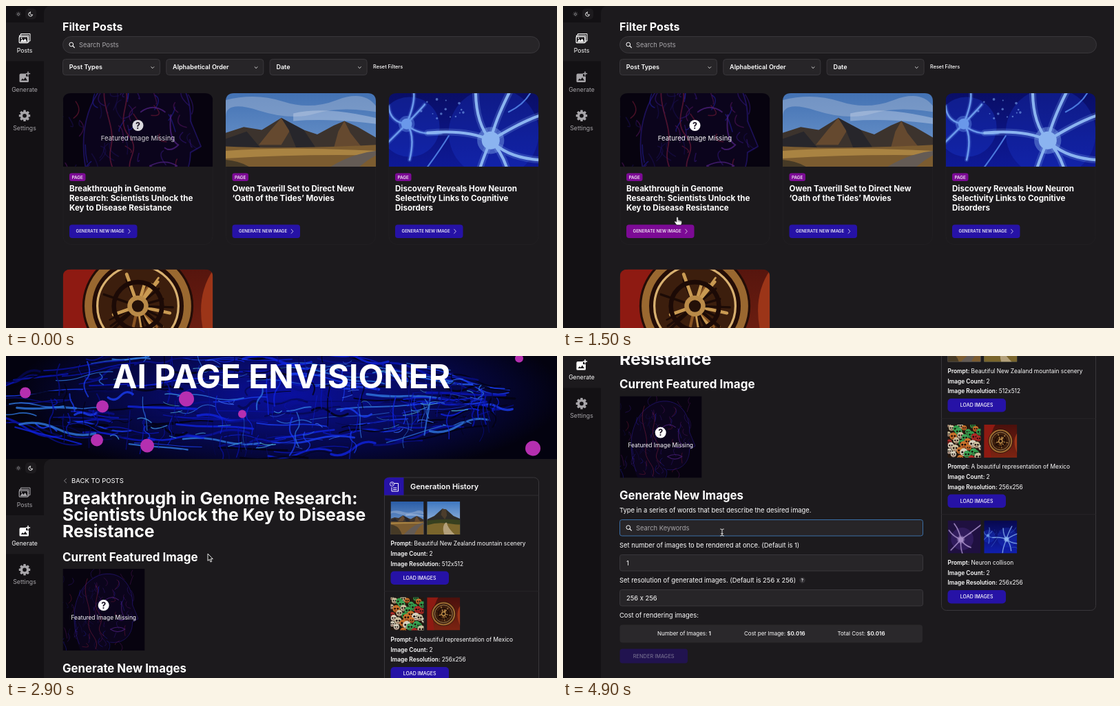
These frames come from a looping animation (800 px wide and 469 px high, 5000 ms). An HTML page:

```html
<!DOCTYPE html>
<html lang="en">
<head>
<meta charset="utf-8">
<title>Post images</title>
<style>
html, body { margin: 0; width: 100%; height: 100%; overflow: hidden; background: #1c1a1d; }
svg { display: block; }
#stage { width: 800px; height: 469px; }
text { font-family: Inter, "Open Sans", sans-serif; white-space: pre; }
</style>
</head>
<body>
<svg id="stage" viewBox="0 0 800 469"></svg>
<script>
const LOOP = 5000, STEP = 100;
const INK = '#1c1a1d', SIDE = '#131114', BLUE = '#2612a6', PURPLE = '#7c0a95';
const FIELD = '#272528', EDGE = '#39373b', GREY = '#a8a6aa', WHITE = '#fff';

let seed = 11;
const rnd = (a = 0, b = 1) => {
  seed = (seed * 16807) % 2147483647;
  return a + (b - a) * seed / 2147483647;
};
const pick = list => list[Math.floor(rnd(0, list.length))];
const many = (n, fn) => Array.from({ length: n }, (_, i) => fn(i)).join('');

// Basic shapes
const rect = (x, y, w, h, fill, r = 0, more = '') =>
  `<rect x="${x}" y="${y}" width="${w}" height="${h}" rx="${r}" fill="${fill}" ${more}/>`;
const dot = (x, y, r, fill, more = '') => `<circle cx="${x}" cy="${y}" r="${r}" fill="${fill}" ${more}/>`;
const shape = (d, fill, more = '') => `<path d="${d}" fill="${fill}" ${more}/>`;
const line = (d, color, w = 1, more = '') =>
  `<path d="${d}" fill="none" stroke="${color}" stroke-width="${w}" stroke-linecap="round" stroke-linejoin="round" ${more}/>`;
const group = (x, y, body, more = '') => `<g transform="translate(${x} ${y})" ${more}>${body}</g>`;
const text = (x, mid, size, weight, str, fill = WHITE, anchor = 'start') =>
  `<text x="${x}" y="${mid + size * .36}" font-size="${size}" font-weight="${weight}" fill="${fill}" text-anchor="${anchor}">${str}</text>`;
const art = (id, x, y, w, h) => `<use href="#${id}" x="${x}" y="${y}" width="${w}" height="${h}"/>`;
const stops = (a, b) => `<stop stop-color="${a}"/><stop offset="1" stop-color="${b}"/>`;
const grad = (id, a, b) => `<linearGradient id="${id}" x2="0" y2="1">${stops(a, b)}</linearGradient>`;
const chevron = (x, y, dx, dy, color = WHITE, w = .8) =>
  line(dx ? `M${x - dx} ${y - 3}L${x + dx} ${y}L${x - dx} ${y + 3}` : `M${x - 2} ${y - dy}L${x} ${y + dy}L${x + 2} ${y - dy}`, color, w);

// Pictures, each in a 100 x 100 box
function neuron(x, y, r, ends, color, w) {
  const arms = ends.map(([ex, ey], i) => {
    const bend = i % 2 ? 5 : -5;
    return `M${x} ${y}Q${(x + ex) / 2 + bend} ${(y + ey) / 2 - bend} ${ex} ${ey}`;
  }).join('');
  return line(arms, color, w * 2.4, 'opacity=".22"') + line(arms, color, w) +
    dot(x, y, r * 1.5, color, 'opacity=".4"') + dot(x, y, r, color);
}

const pictures = {
  face: () => rect(0, 0, 100, 100, '#07030f') +
    shape('M22 100C8 70 10 20 45 6C72 0 88 22 86 48L92 62L85 66C84 82 74 92 58 90L54 100Z', '#0b041c') +
    many(80, () => {
      const x = rnd(0, 88), y = rnd(0, 92), c = pick(['#34167a', '#2220a0', '#561560', '#7c1a38', '#1a1050']);
      return line(`M${x} ${y}q${rnd(-8, 8)} ${rnd(2, 8)} ${rnd(-5, 5)} ${rnd(4, 13)}`, c, .7, 'opacity=".55"');
    }) +
    line('M20 92C8 62 12 22 44 8C70 0 86 20 85 44L92 61L85 65C85 80 76 92 58 90', '#2a1a86', .8, 'opacity=".6"') +
    line('M30 12C22 34 36 44 32 62S46 84 40 98M40 20C48 30 34 42 44 54S36 72 50 82', '#7c1d3c', .8, 'opacity=".6"') +
    line('M52 38Q60 32 68 38M72 40Q70 56 77 60Q72 65 68 62M58 74Q68 69 76 74Q67 80 58 74', '#4a1f78', .9, 'opacity=".8"'),
  valley: () => rect(0, 0, 100, 100, 'url(#sky)') +
    shape('M0 30Q20 25 38 31T74 30T100 34V38Q76 34 60 39T22 37T0 41Z', '#9fb4d4', 'opacity=".5"') +
    shape('M45 39Q66 34 100 42V46Q70 42 45 44Z', '#c3d0e6', 'opacity=".45"') +
    shape('M0 52L12 48L24 50L37 42L52 50L61 53L72 47L79 44L88 48L100 55V64H0Z', '#3c332d') +
    shape('M37 42L43 50L37 60H22L30 50ZM79 44L83 52L91 62H72L75 51Z', '#65492f') +
    shape('M37 42L52 50L60 62H47L42 50ZM0 56L14 51L24 63H0Z', '#27262b') +
    shape('M0 61Q40 63 100 60V100H0Z', '#7c5c30') +
    shape('M0 64Q40 61 100 64V67Q50 66 0 69Z', '#a98342') +
    shape('M100 64Q70 67 40 100H72Q80 78 100 67Z', '#645b55') +
    shape('M0 70Q25 72 34 100H0Z', '#463a26'),
  peak: () => rect(0, 0, 100, 100, 'url(#haze)') +
    shape('M0 54L22 44L46 22L58 24L80 44L100 52V70H0Z', '#2e2c28') +
    shape('M46 22L42 40L54 54L60 42L58 24Z', '#4c3d2c') +
    shape('M0 58Q50 50 100 56V100H0Z', '#37401f') +
    shape('M0 72Q30 62 60 66T100 70V100H0Z', '#7a652c') +
    shape('M56 64Q44 76 52 100H84Q62 80 60 64Z', '#b3a07a'),
  nerve: () => rect(0, 0, 100, 100, 'url(#deep)') +
    dot(70, 52, 30, '#1c39d0', 'opacity=".3"') + dot(14, 48, 20, '#1c39d0', 'opacity=".35"') +
    many(14, () => dot(rnd(20, 50), rnd(29, 44), rnd(.4, .9), '#7aa6ef', 'opacity=".6"')) +
    neuron(12, 46, 3.6, [[0, 34], [16, 22], [-2, 60], [24, 33], [35, 52], [14, 70]], '#6a98ea', 1.2) +
    neuron(68, 57, 6, [[84, 18], [102, 40], [100, 70], [82, 92], [56, 98], [26, 52], [58, 24]], '#8bb4f0', 1.9) +
    line('M80 38Q92 32 96 22M40 54Q34 64 22 80M84 82Q96 78 102 86', '#4a78dc', 1),
  violet: () => rect(0, 0, 100, 100, '#1f1040') + dot(44, 56, 34, '#432678', 'opacity=".5"') +
    neuron(40, 58, 8, [[4, 30], [10, 90], [46, 104], [70, 38], [100, 14], [20, 10], [70, 82]], '#a58cc6', 2.4),
  dial: () => rect(0, 0, 100, 100, 'url(#ember)') +
    shape('M0 0H34Q10 40 22 100H0Z', '#8e1a12') + shape('M100 26Q84 50 100 86Z', '#9c3518') +
    dot(50, 50, 37, '#240d07') + dot(50, 50, 33, 'none', 'stroke="#9a6830" stroke-width="5"') +
    dot(50, 50, 27, '#3c1e0d', 'stroke="#d8b070" stroke-width="1.5"') +
    many(26, () => {
      const a = rnd(0, 6.28), r = rnd(14, 25);
      return line(`M50 50l${r * Math.cos(a)} ${r * Math.sin(a)}`, pick(['#8a5422', '#c99a52', '#1c0b06']), rnd(1, 2.4));
    }) +
    dot(50, 50, 16, 'none', 'stroke="#1c0a06" stroke-width="3"') + dot(50, 50, 7, '#b98a48') + dot(50, 50, 4, '#241008'),
  skulls: () => rect(0, 0, 100, 100, '#24170f') + many(38, i => {
    const x = (i * 37) % 100 + rnd(-6, 6), y = i * 2.7 + rnd(-4, 4), r = rnd(7, 12);
    const c = pick(['#2f9b4a', '#b02a26', '#c9bd9c', '#3aa454', '#c8702a', '#d6d0bc']);
    return dot(x, y, r, c) + dot(x - r * .38, y, r * .27, '#1c0e0c') + dot(x + r * .38, y, r * .27, '#1c0e0c') +
      line(`M${x - r * .4} ${y + r * .6}h${r * .8}`, '#5a1414', 1.6);
  })
};

const defs = () => '<defs>' +
  grad('sky', '#2a5da6', '#8db0dc') + grad('haze', '#3f78c0', '#bfd2ea') +
  grad('deep', '#07084e', '#101fae') + grad('ember', '#4a100c', '#7c2412') +
  `<radialGradient id="glow">${stops('#0a10a0', '#03020f')}</radialGradient>` +
  '<clipPath id="top"><path d="M0 107V12Q0 0 12 0H206Q218 0 218 12V107Z"/></clipPath>' +
  '<clipPath id="strip"><path d="M0 -90H800V183.5H0Z"/></clipPath>' +
  Object.keys(pictures).map(id =>
    `<symbol id="${id}" viewBox="0 0 100 100" preserveAspectRatio="xMidYMid slice">${pictures[id]()}</symbol>`).join('') +
  '</defs>';

function banner() {
  // Half height of the fibre bundle, which narrows to both ends
  const half = x => 12 + 74 * Math.sin(Math.PI * Math.min(1, Math.max(0, (x + 90) / 850)));
  const tones = ['#03020f', '#060850', '#080e86', '#0a16b8', '#0f24e0', '#1a3cf0', '#0a12a0', '#2f78e0'];
  const strands = many(230, () => {
    const w = rnd(30, 130), x = rnd(-30, 740 - w), y = rnd(-1, 1), a = half(x) * y, b = half(x + w) * y + rnd(-8, 8);
    return line(`M${x} ${100 + a}q${w / 4} ${rnd(-9, 9)} ${w / 2} ${(b - a) / 2}t${w / 2} ${(b - a) / 2}`,
      pick(tones), rnd(.7, 3.6), 'opacity=".8"');
  });
  const threads = many(120, () => {
    const x = rnd(60, 735), h = half(x), y = rnd(-1, .6) * h, d = rnd(14, 60);
    return line(`M${x} ${100 + y}q${rnd(-8, 8)} ${d / 3} ${rnd(-4, 4)} ${d / 2}t${rnd(-5, 5)} ${d / 2}`,
      pick(tones), rnd(.6, 2.2), 'opacity=".75"');
  });
  const sparks = many(45, () => {
    const x = rnd(150, 700), y = 100 + half(x) * rnd(-.8, .8);
    return line(`M${x} ${y}q${rnd(2, 10)} ${rnd(-6, 6)} ${rnd(8, 24)} ${rnd(-6, 6)}`, pick(['#3f96d8', '#4fb0d0', '#3a6cf0']), rnd(.6, 1.5), 'opacity=".8"');
  });
  const cells = [[262, 96, 11], [343, 118, 6], [140, 107, 9], [28, 87, 8], [132, 156, 9],
    [205, 164, 10], [765, 168, 11], [745, 37, 6], [60, 4, 7]]
    .map(([x, y, r]) => dot(x, y, r, '#b52fb0')).join('');
  return '<g clip-path="url(#strip)">' + rect(0, -90, 800, 280, '#03020f') +
    '<ellipse cx="410" cy="90" rx="400" ry="125" fill="url(#glow)"/>' +
    strands + threads + sparks + cells + '</g>' +
    text(400, 63.5, 47.8, 700, 'AI PAGE ENVISIONER', WHITE, 'middle');
}

// Interface parts
const lens = (x, y) => dot(x - .7, y - .7, 2.9, 'none', `stroke="${WHITE}" stroke-width="1"`) +
  line(`M${x + 1.5} ${y + 1.5}l2.3 2.3`, WHITE, 1.2);
const missing = (x, y, size, gap, more = '') => `<g ${more}>` + dot(x, y, 8, WHITE) +
  text(x, y, 12.5, 700, '?', '#171020', 'middle') +
  text(x, y + gap, size, 400, 'Featured Image Missing', WHITE, 'middle') + '</g>';
const field = (x, y, w, h, r, more = '') => rect(x, y, w, h, FIELD, r, `stroke="${EDGE}" stroke-width="1" ${more}`);

function card(x, y, pic, lines, more = '', button = '') {
  return group(x, y,
    rect(.5, .5, 217, 220, INK, 12, 'stroke="#211f22"') +
    `<g clip-path="url(#top)">${art(pic, 0, 0, 218, 107)}</g>` + more +
    rect(9.5, 116.5, 23.5, 11.5, PURPLE, 3) + text(21.2, 122.3, 6.4, 500, 'PAGE', WHITE, 'middle') +
    lines.map((s, i) => text(9.5, 139.3 + i * 13.6, 11.6, 700, s)).join('') +
    rect(9.5, 191.5, 98.5, 19.5, BLUE, 4, button) +
    text(19, 201.2, 6.2, 500, 'GENERATE NEW IMAGE') + chevron(96.5, 201.2, 1.3, 0, WHITE, .7));
}

const posts = () => text(82, 30.3, 16, 700, 'Filter Posts') +
  field(82.5, 44.5, 692, 24, 12) + lens(95.5, 56.7) + text(106, 56.7, 9.3, 400, 'Search Posts', GREY) +
  ['Post Types', 'Alphabetical Order', 'Date'].map((s, i) => {
    const x = 82.5 + i * 150.3;
    return field(x, 77.5, 141, 23, 4) + text(x + 9.3, 88.7, 9, 600, s) + chevron(x + 130.3, 89.7, 0, 1);
  }).join('') +
  text(533, 88.8, 7.3, 500, 'Reset Filters') +
  card(82.5, 127, 'face', ['Breakthrough in Genome', 'Research: Scientists Unlock the', 'Key to Disease Resistance'],
    missing(109, 47, 9.5, 18.3, 'id="note"'), 'id="action"') +
  card(319, 127, 'valley', ['Owen Taverill Set to Direct New', '‘Oath of the Tides’ Movies']) +
  card(555.5, 127, 'nerve', ['Discovery Reveals How Neuron', 'Selectivity Links to Cognitive', 'Disorders']) +
  card(82.5, 383.5, 'dial', []);

const pair = (x, y, size, name, value) =>
  `<text x="${x}" y="${y + size * .36}" font-size="${size}" fill="#fff"><tspan font-weight="${name[1]}">${name[0]} </tspan><tspan font-weight="${value[1]}">${value[0]}</tspan></text>`;

function entry(i, [a, b, prompt, res]) {
  const fact = (y, name, value) => pair(558.5, y, 8.35, [name, 600], [value, 400]);
  return group(0, i * 139.5,
    art(a, 558.5, 60.5, 48, 48) + art(b, 611.3, 60.5, 48, 48) +
    fact(121.7, 'Prompt:', prompt) + fact(136.5, 'Image Count:', '2') + fact(151, 'Image Resolution:', res) +
    rect(558.5, 162, 84.5, 19.5, BLUE, 5) + text(600.7, 171.7, 7, 500, 'LOAD IMAGES', WHITE, 'middle') +
    (i < 2 ? line('M549.5 191.2H773.5', '#29272b', .8) : ''));
}

const history = () => rect(549.5, 25.5, 224, 445, 'none', 7, 'stroke="#39373b"') +
  shape('M549 51.5V32Q549 25.5 556 25.5H577.5V51.5Z', BLUE) + line('M549.5 51.5H773.5', '#343236', .8) +
  line('M562 34H569.5V45.5H560V40M562.5 40.5H567M562.5 43H567', WHITE, 1) +
  dot(560.5, 35, 3, BLUE, 'stroke="#fff" stroke-width=".9"') + line('M560.5 33.5V35.2H561.8', WHITE, .7) +
  text(587, 38.3, 10.9, 600, 'Generation History') +
  [['valley', 'peak', 'Beautiful New Zealand mountain scenery', '512x512'],
   ['skulls', 'dial', 'A beautiful representation of Mexico', '256x256'],
   ['violet', 'nerve', 'Neuron collison', '256x256']].map((e, i) => entry(i, e)).join('');

const generator = () => chevron(86, 30.3, -1.6, 0, GREY) + text(95, 30.4, 9.5, 400, 'BACK TO POSTS') +
  ['Breakthrough in Genome Research:', 'Scientists Unlock the Key to Disease', 'Resistance']
    .map((s, i) => text(82, 56 + i * 24, 24.8, 700, s)).join('') +
  text(82, 141.3, 17, 700, 'Current Featured Image') +
  art('face', 82.5, 158.5, 119, 119) + missing(141.7, 211.6, 8.4, 18) +
  text(82, 303, 16.8, 700, 'Generate New Images') +
  text(82, 324.5, 9.4, 400, 'Type in a series of words that best describe the desired image.') +
  field(82.5, 338.5, 440, 23.5, 3, 'id="prompt"') + lens(95.5, 350.4) + text(106, 350.4, 9.4, 400, 'Search Keywords', GREY) +
  text(82, 375.5, 9.4, 400, 'Set number of images to be rendered at once. (Default is 1)') +
  field(82.5, 389.5, 440, 23.5, 3) + text(92, 401.3, 9.4, 400, '1') +
  text(82, 426.3, 9.4, 400, 'Set resolution of generated images. (Default is 256 x 256)') +
  dot(347.5, 426.5, 4.2, '#343236') + text(347.5, 426.5, 6, 600, '?', WHITE, 'middle') +
  field(82.5, 440.5, 440, 23.5, 3) + text(92, 452.3, 9.4, 400, '256 x 256') +
  text(82, 477.5, 9.4, 400, 'Cost of rendering images:') +
  rect(82.5, 491.5, 439.5, 26, '#2a282b', 4) +
  [[137, 'Number of Images:', '1'], [263, 'Cost per Image:', '$0.016'], [398.5, 'Total Cost:', '$0.016']]
    .map(([x, a, b]) => pair(x, 504.5, 8, [a, 400], [b, 600])).join('') +
  rect(82.5, 526.5, 98.5, 21, '#21134f', 4) + text(131.7, 537, 7.4, 500, 'RENDER IMAGES', '#716a8c', 'middle') +
  history();

const icons = [
  line('M-5.5 -4V-6.5H8V4H6', 'currentColor', 1) + line('M-7.5 -1.5V-4.2H5.8V6', 'currentColor', 1) +
    rect(-7.8, -2.3, 12.6, 9, 'none', 1, 'stroke="currentColor" stroke-width="1.2"') +
    shape('M-6.5 5.5L-3.5 1.2L-1.5 3.5L.8 .5L3.8 5.5Z', 'currentColor') + dot(-4.5, 0, .9, 'currentColor'),
  shape('M-5.5 -5H2V-1H6V6Q6 7.5 4.5 7.5H-6Q-7.5 7.5 -7.5 6V-3Q-7.5 -5 -5.5 -5ZM-5.3 5H4L1 .7L-1.4 3.8L-3 2Z', 'currentColor', 'fill-rule="evenodd"') +
    line('M5 -7.5V-2.5M2.5 -5H7.5', 'currentColor', 1.5),
  dot(0, 0, 4.6, 'none', 'stroke="currentColor" stroke-width="3.4"') +
    many(8, i => `<rect x="-1.7" y="-8.2" width="3.4" height="4" rx=".6" fill="currentColor" transform="rotate(${i * 45})"/>`)
];
const sidebar = () => rect(28, 3.5, 16, 16, '#1d1b1e', 5) +
  dot(18, 11.8, 1.5, 'none', `stroke="${GREY}" stroke-width=".8"`) +
  many(8, i => `<path d="M0 -2.6V-3.4" stroke="${GREY}" stroke-width=".7" transform="translate(18 11.8) rotate(${i * 45})"/>`) +
  line('M35.3 9A3 3 0 1 0 38.6 12.7A2.6 2.6 0 0 1 35.3 9Z', WHITE, .9) +
  rect(0, 24, 55, 56.5, INK, 0, 'id="mark"') +
  ['Posts', 'Generate', 'Settings'].map((s, i) => {
    const y = 47 + i * 56.4;
    return `<g class="tab">${group(27, y, icons[i])}${text(27, y + 18, 8.7, 400, s, 'currentColor', 'middle')}</g>`;
  }).join('');

const pointers = {
  hand: shape('M-1.2 1Q0 -1 1.2 1V4.6L5 5.6Q7 6.2 6.6 8.6L5.6 12H-1L-4.4 7.4Q-3.2 5.6 -1.2 7.4Z', WHITE, 'stroke="#111" stroke-width=".7"') +
    line('M1.2 5V7.5M3.4 5.6V7.6M5 6V8', '#333', .5),
  arrow: shape('M0 0V10.3L2.4 8.2L4 12L5.7 11.2L4.1 7.6H7.3Z', '#111', 'stroke="#fff" stroke-width=".9"'),
  beam: line('M-2.4 -5Q0 -5 0 -3.6Q0 -5 2.4 -5M0 -3.6V3.6M-2.4 5Q0 5 0 3.6Q0 5 2.4 5M-1.3 1.6H1.3', '#ddd', 1)
};

const $ = id => document.getElementById(id);
$('stage').innerHTML = defs() + rect(0, 0, 800, 469, INK) +
  `<g id="page">${rect(0, -1.5, 800, 900, SIDE)}${rect(55, -1.5, 800, 900, INK, 12)}</g>` +
  `<g id="side">${sidebar()}</g><g id="posts">${posts()}</g><g id="maker">${generator()}</g>` +
  `<g id="banner">${banner()}</g><g id="cursor">` +
  Object.keys(pointers).map(k => `<g id="${k}">${pointers[k]}</g>`).join('') + '</g>';
const tabs = [...document.querySelectorAll('.tab')];

// Motion: [time, values...]
const scroll = [[1900, 0], [2000, 30], [2200, 160], [2300, 185], [2700, 185], [2900, 151.5], [3300, -78], [3500, -92], [3800, -100]];
const path = [[500, 246, 470], [1000, 166, 307], [1500, 166, 307], [1900, 192, 276], [2400, 192, 276],
  [2900, 293, 288], [3700, 293, 288], [4300, 231, 257]];

function at(track, t, ease = k => k) {
  if (t <= track[0][0]) return track[0].slice(1);
  const i = track.findIndex(p => p[0] > t);
  if (i < 0) return track[track.length - 1].slice(1);
  const a = track[i - 1], b = track[i], k = ease((t - a[0]) / (b[0] - a[0]));
  return a.slice(1).map((v, n) => v + (b[n + 1] - v) * k);
}
const smooth = k => k * k * (3 - 2 * k);
const move = (id, x, y) => $(id).setAttribute('transform', `translate(${x} ${y})`);
const show = (id, on) => $(id).setAttribute('display', on ? 'inline' : 'none');

function draw(t) {
  const making = t >= 1900, [y] = at(scroll, t), [cx, cy] = at(path, t, smooth);
  const kind = t >= 4100 ? 'beam' : t >= 1000 && !making ? 'hand' : 'arrow';
  move('page', 0, y);
  move('side', 0, Math.max(y, -90.5));
  move('maker', 0, y);
  move('banner', 0, y - 185);
  move('cursor', cx, cy);
  show('posts', !making);
  show('maker', making);
  show('banner', making);
  show('cursor', t >= 500);
  for (const k in pointers) show(k, k === kind);
  $('mark').setAttribute('y', making ? 80.5 : 24);
  tabs.forEach((tab, i) => tab.setAttribute('color', i === +making ? WHITE : GREY));
  $('note').setAttribute('opacity', t >= 800 ? 1 : .85);
  $('action').setAttribute('fill', t >= 1000 ? PURPLE : BLUE);
  $('prompt').setAttribute('stroke', t >= 4400 ? '#3a6ea6' : EDGE);
}

function tick() {
  draw(Math.floor(performance.now() % LOOP / STEP) * STEP);
  requestAnimationFrame(tick);
}
tick();
</script>
</body>
</html>
```
